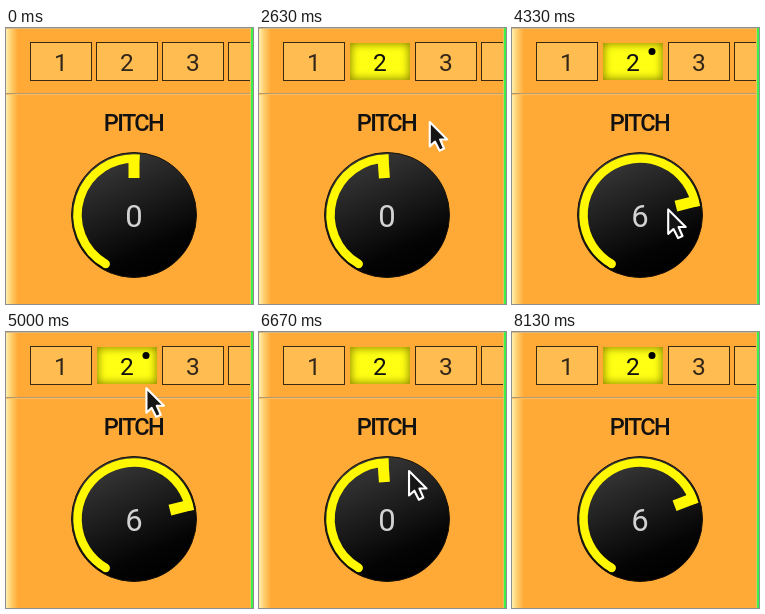
Write an HTML page that moves like this. It is 247 px wide and 276 px high and loops after 8.83 s.

```html
<!DOCTYPE html>
<html lang="en">
<head>
<meta charset="utf-8">
<title>Pitch knob</title>
<style>
  html, body { margin: 0; width: 100%; height: 100%; overflow: hidden; background: #ffa936; }
  svg { position: absolute; left: 0; top: 0; display: block; }
  text { font-family: Roboto, sans-serif; text-anchor: middle; }
  .tab rect { fill: #ffbc51; stroke: #3a2a12; }
  .tab text { font-size: 24.5px; fill: #33271a; }
  #lit {
    position: absolute; left: 91px; top: 15px; width: 60px; height: 37px;
    background: #ffff14; box-shadow: 0 0 0 1px #ffa936, inset 0 0 9px 1px #8d8600;
  }
</style>
</head>
<body>
<svg width="247" height="276" viewBox="0 0 247 276">
  <defs>
    <linearGradient id="glow">
      <stop offset="0" stop-color="#ffefb0"/>
      <stop offset=".4" stop-color="#ffd171"/>
      <stop offset="1" stop-color="#ffa936"/>
    </linearGradient>
  </defs>
  <rect width="247" height="276" fill="#ffa936"/>
  <rect width="12" height="276" fill="url(#glow)"/>
  <rect width="247" height="1" fill="#d6b683"/>
  <rect y="65" width="247" height="1" fill="#b39a70"/>
  <rect y="66" width="247" height="1" fill="#ffbe62"/>
  <g id="tabs"></g>
  <rect x="244" width="1" height="276" fill="#e3c45c"/>
  <rect x="245" width="2" height="276" fill="#3df04a"/>
</svg>
<div id="lit"></div>
<svg width="247" height="276" viewBox="0 0 247 276">
  <defs>
    <linearGradient id="face" x1=".3" y1=".05" x2=".7" y2=".95">
      <stop offset="0" stop-color="#383838"/>
      <stop offset=".8" stop-color="#040404"/>
      <stop offset="1" stop-color="#000"/>
    </linearGradient>
  </defs>
  <text id="two" x="121" y="43" font-size="24.5">2</text>
  <circle id="dot" cx="140" cy="23.5" r="3.5"/>
  <text x="127.5" y="103" font-size="23.5" font-weight="500" letter-spacing="-1.6" fill="#111">PITCH</text>
  <g transform="translate(128 187)">
    <circle r="62.5" fill="url(#face)" stroke="#1a1408"/>
    <path id="arc" fill="none" stroke="#fff800" stroke-width="8.5"/>
    <circle id="cap" r="4.2" fill="#fff800"/>
    <rect id="bar" x="-5.5" y="-60" width="11" height="23" fill="#fff800"/>
    <text id="value" y="11.5" font-size="31" fill="#d2d2d2">0</text>
  </g>
  <g id="cursor">
    <g id="ring" fill="none">
      <circle r="36" fill="#fff" fill-opacity=".08"/>
      <circle r="36" stroke="#fff" stroke-opacity=".8"/>
      <circle r="34.5" stroke="#111" stroke-width="2.4"/>
      <circle r="32.8" stroke="#fff" stroke-width="1.2"/>
    </g>
    <path id="arrow" transform="scale(1.06)" d="M0 0V23L5 18.5L9.3 27L13.5 25L9.8 16.5H16.5Z"
      fill="#151515" stroke="#fff" stroke-width="2" stroke-linejoin="round"/>
    <g id="hand" transform="translate(-1 -1)" stroke="#222" stroke-width="1.7" stroke-linejoin="round" stroke-linecap="round">
      <path fill="#fff" d="M1 1Q3-1 5 2L8 9Q9 7 11 9Q13 7 14.5 9Q17 8 18 11L19 18L18 24L8 26L4 21L-3 16Q-3 13 0 13.5L3 15L0 4Q-.5 2 1 1Z"/>
      <path fill="none" d="M8 9L9 13M11 9L12.3 13M14.5 9L15.5 12.5M9 17L10 22M12 16.5L13 21.5M15 16L16 21"/>
    </g>
  </g>
</svg>
<script>
const LOOP = 8830, APPEAR = 430, EXIT = 7930, GONE = 8130;
const CENTER = [128, 187], ENTRY = [172, 4], BUTTON = [138, 37], REST = [139, 46];

// Each lap clicks the button, drifts off it, then grabs and turns the knob.
// from / to: angle and distance of the grip around the knob centre.
const LAPS = [
  { start: 430, click: 930, free: 1430, leave: 2300, grab: 3040, turn: 3400,
    drag: 3600, drop: 4130, bend: 32, from: [21, 30], to: [76, 27] },
  { start: 4500, click: 5150, free: 5430, leave: 6240, grab: 6800, turn: 6900,
    drag: 6900, drop: 7450, bend: 12, from: [25, 38], to: [69, 40] }
];
const [first, second] = LAPS;

const $ = id => document.getElementById(id);
const show = (id, on) => { $(id).style.display = on ? "" : "none"; };
const place = (id, value) => $(id).setAttribute("transform", value);
const ramp = (t, a, b) => Math.min(1, Math.max(0, (t - a) / (b - a)));
const ease = (t, a, b) => { const p = ramp(t, a, b); return p * p * (3 - 2 * p); };
const mix = (a, b, k) => a.map((v, i) => v + (b[i] - v) * k);
const polar = (angle, r) => {
  const a = angle * Math.PI / 180;
  return [r * Math.sin(a), -r * Math.cos(a)];
};

$("tabs").innerHTML = [1, "", 3, ""].map((n, i) => {
  const x = 24 + i * 66;
  return `<g class="tab"><rect x="${x + .5}" y="14.5" width="61" height="38"/>
    <text x="${x + 31}" y="43">${n}</text></g>`;
}).join("");
const [capX, capY] = polar(-150, 56.5);
place("cap", `translate(${capX} ${capY})`);

const grip = (lap, t) => mix(lap.from, lap.to, ease(t, lap.drag, lap.drop));

// The pointer tip sits just right of and below the grip.
function tip(lap, t) {
  const [x, y] = polar(...grip(lap, t));
  return [CENTER[0] + x + 2, CENTER[1] + y + 1];
}

function travel(lap, origin, t) {
  let p = mix(origin, BUTTON, ease(t, lap.start, lap.click));
  p = mix(p, REST, ease(t, lap.free, lap.free + 350));
  const k = ease(t, lap.leave, lap.grab);
  p = mix(p, tip(lap, t), k);
  p[0] += lap.bend * Math.sin(Math.PI * k);
  return p;
}

function cursorAt(t) {
  const p = t < second.start
    ? travel(first, ENTRY, t)
    : travel(second, tip(first, t), t);
  const out = ramp(t, EXIT, GONE);
  return [p[0] + 36 * out, p[1] + 14 * out];
}

const pressAt = t => LAPS.reduce((sum, l) => sum
  + ramp(t, l.click, l.click + 130) - ramp(t, l.free, l.free + 170)
  + ramp(t, l.grab, l.grab + 130) - ramp(t, l.drop, l.drop + 200), 0);

const activeLap = t => LAPS.find((l, i) =>
  t >= l.turn && t < (i ? LOOP : second.click + 80));

function drawKnob(lap, t) {
  const angle = lap ? grip(lap, t - 45)[0] : t < first.free ? 0 : -4;
  const [x, y] = polar(angle + 5.5, 56.5);
  const large = angle + 155.5 > 180 ? 1 : 0;
  $("arc").setAttribute("d", `M${capX} ${capY}A56.5 56.5 0 ${large} 1 ${x} ${y}`);
  place("bar", `rotate(${angle})`);
  $("value").textContent = Math.max(0, Math.round((angle - 20) / 8.8));
}

function drawCursor(t) {
  const [x, y] = cursorAt(t), press = pressAt(t);
  const over = x > 90 && x < 152 && y > 14 && y < 53;
  show("cursor", t >= APPEAR && t < GONE);
  place("cursor", `translate(${x} ${y})`);
  $("cursor").setAttribute("opacity", ramp(t, APPEAR - 30, APPEAR + 60) * ramp(t, GONE, GONE - 80));
  show("hand", over);
  show("arrow", !over);
  show("ring", press > .01);
  place("ring", `translate(-2 -1) scale(${press})`);
  $("ring").setAttribute("opacity", press);
}

function draw(t) {
  const lap = activeLap(t), lit = t >= first.click;
  show("lit", lit);
  $("two").setAttribute("fill", lit ? "#111" : "#33271a");
  show("dot", lap);
  drawKnob(lap, t);
  drawCursor(t);
}

function frame(now) {
  draw(now % LOOP);
  requestAnimationFrame(frame);
}
draw(0);
requestAnimationFrame(frame);
</script>
</body>
</html>
```
